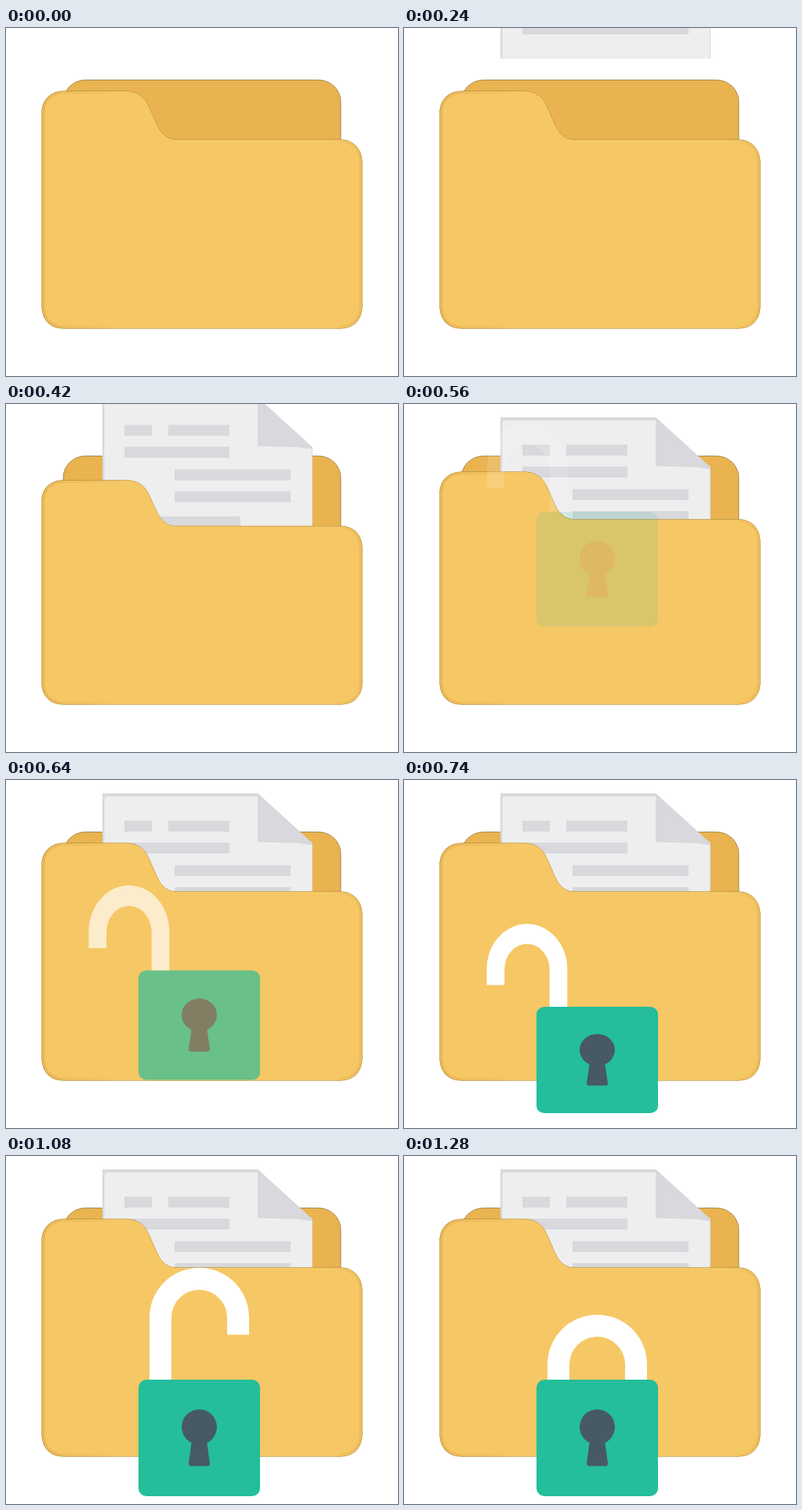
An HTML page with a canvas that plays this animation: 500 by 445 pixels, repeating every 1.8 s.

```html
<!DOCTYPE html>
<html lang="en">
<head>
<meta charset="utf-8">
<title>Locked folder</title>
<style>
  html, body { margin: 0; width: 100%; height: 100%; overflow: hidden; background: #fff; }
  canvas { display: block; }
</style>
</head>
<body>
<canvas id="stage" width="500" height="445"></canvas>
<script>
const W = 500, H = 445, LOOP = 1800, STEP = 20;
const ctx = document.getElementById('stage').getContext('2d');
const layer = document.createElement('canvas');
layer.width = W;
layer.height = H;
const lock = layer.getContext('2d');

const color = {
  back: '#e9b44f', front: '#f6c765', rim: 'rgba(95, 75, 20, .6)',
  paper: '#eeeeee', line: '#d9d8dd', body: '#24be9a', hole: '#475a64'
};

const span = (t, a, b) => Math.min(1, Math.max(0, (t - a) / (b - a)));
const quartInOut = u => u < .5 ? 8 * u ** 4 : 1 - 8 * (1 - u) ** 4;
const quadOut = u => 1 - (1 - u) ** 2;
const sineInOut = u => (1 - Math.cos(Math.PI * u)) / 2;
const bump = u => Math.sin(Math.PI * u);

const backShape = new Path2D();
backShape.roundRect(73, 66.5, 354, 300, 28);

const frontShape = new Path2D(
  'M45.5 108 C45.5 92 57 80.5 73 80.5 L155 80.5 ' +
  'C168 81 177 88 182 99 L193 124 C199 137 206 142.5 219 142.5 ' +
  'L427 142.5 C443 142.5 454.5 155 454.5 171 L454.5 356 ' +
  'C454.5 373 443 384.5 427 384.5 L73 384.5 C57 384.5 45.5 373 45.5 356 Z');

const shade = ctx.createLinearGradient(45, 0, 455, 0);
shade.addColorStop(0, 'rgba(214, 160, 66, .4)');
shade.addColorStop(.25, 'rgba(214, 160, 66, 0)');
shade.addColorStop(.9, 'rgba(214, 160, 66, 0)');
shade.addColorStop(1, 'rgba(214, 160, 66, .3)');

const PAPER_BOTTOM = 356;

function strokeRim(shape) {
  ctx.strokeStyle = color.rim;
  ctx.lineWidth = .9;
  ctx.stroke(shape);
}

function polygon(fill, points) {
  ctx.fillStyle = fill;
  ctx.beginPath();
  points.forEach(([x, y]) => ctx.lineTo(x, y));
  ctx.fill();
}

function drawBack() {
  ctx.fillStyle = color.back;
  ctx.fill(backShape);
  strokeRim(backShape);
}

function drawBar(row, left, right) {
  const paragraphGap = row > 3 ? 4 : 0;
  ctx.fillRect(left, Math.round(52 + 28.3 * row + paragraphGap), right - left, 14);
}

function drawPaper(t) {
  ctx.save();
  ctx.translate(0, PAPER_BOTTOM * (quartInOut(span(t, 64, 578)) - 1));
  polygon(color.line,
    [[123, 17], [321, 17], [391, 81], [391, PAPER_BOTTOM], [123, PAPER_BOTTOM]]);
  ctx.fillStyle = color.paper;
  ctx.beginPath();
  ctx.roundRect(125.5, 21, 195.5, 70, [4, 0, 0, 0]);
  ctx.fill();
  ctx.fillRect(125.5, 79, 264.5, PAPER_BOTTOM - 79);
  polygon(color.line, [[321, 17], [391, 81], [389, 83], [370, 80.5], [321, 79.5]]);

  drawBar(0, 151, 186);
  drawBar(0, 207, 285);
  drawBar(1, 151, 285);
  drawBar(2, 215, 363);
  drawBar(3, 215, 363);
  drawBar(4, 151, 299);
  for (let row = 5; row < 10; row++) drawBar(row, 151, 363);
  ctx.restore();
}

function drawFront(t) {
  const squash = 1 - .056 * bump(span(t, 280, 596));
  ctx.save();
  ctx.translate(0, 385 * (1 - squash));
  ctx.scale(1, squash);
  ctx.fillStyle = color.front;
  ctx.fill(frontShape);
  ctx.clip(frontShape);
  ctx.strokeStyle = shade;
  ctx.lineWidth = 8;
  ctx.stroke(frontShape);
  strokeRim(frontShape);
  ctx.restore();
}

// Shackle in its own space: x from the hinge leg, y from the top of the arch.
function drawShackle(top, turn, squash) {
  const thick = 28, outer = 63.5, leg = 85.5, hinge = thick / 2;
  const middle = outer - hinge, end = 2 * outer - hinge;
  lock.save();
  lock.translate(197, top);
  lock.scale(turn, squash);
  lock.fillStyle = '#fff';
  lock.beginPath();
  lock.moveTo(-hinge, 190);
  lock.arc(middle, outer, outer, Math.PI, 0);
  lock.lineTo(end, leg);
  lock.lineTo(end - thick, leg);
  lock.arc(middle, outer, outer - thick, 0, Math.PI, true);
  lock.lineTo(hinge, 190);
  lock.fill();
  lock.restore();
}

function drawBody(top, squash) {
  lock.save();
  lock.translate(246.5, top);
  lock.scale(1, squash);
  lock.fillStyle = color.body;
  lock.beginPath();
  lock.roundRect(-77.5, 0, 155, 149, 10);
  lock.fill();
  lock.fillStyle = color.hole;
  lock.beginPath();
  lock.arc(0, 60.5, 22.5, 0, 2 * Math.PI);
  lock.fill();
  lock.fill(new Path2D(
    'M-9 74 L9 74 L13.5 107 Q13.5 110.5 10 110.5 L-10 110.5 Q-13.5 110.5 -13.5 107 Z'));
  lock.restore();
}

// The lock falls in, swings its shackle over, lifts it and snaps shut.
function drawLock(t) {
  const fall = quadOut(span(t, 520, 738));
  const swing = quadOut(span(t, 757, 1080));
  const lift = sineInOut(span(t, 940, 1080));
  const snap = span(t, 1180, 1280);

  const squash = 1 - .087 * bump(span(t, 540, 940));
  const center = 358 - 220 * (1 - fall) + 2.5 * lift;
  const top = center - 74.5 * squash;
  const gap = 116 + 27 * lift - 60 * snap;

  lock.clearRect(0, 0, W, H);
  drawShackle(top - gap * squash, Math.cos(2.515 * (1 - swing)), squash);
  drawBody(top, squash);
  ctx.globalAlpha = span(t, 540, 690);
  ctx.drawImage(layer, 0, 0);
  ctx.globalAlpha = 1;
}

function render(t) {
  ctx.fillStyle = '#fff';
  ctx.fillRect(0, 0, W, H);
  drawBack();
  drawPaper(t);
  drawFront(t);
  drawLock(t);
}

const start = performance.now();
function tick() {
  const t = (performance.now() - start) % LOOP;
  render(Math.floor(t / STEP) * STEP);
  requestAnimationFrame(tick);
}
tick();
</script>
</body>
</html>
```
